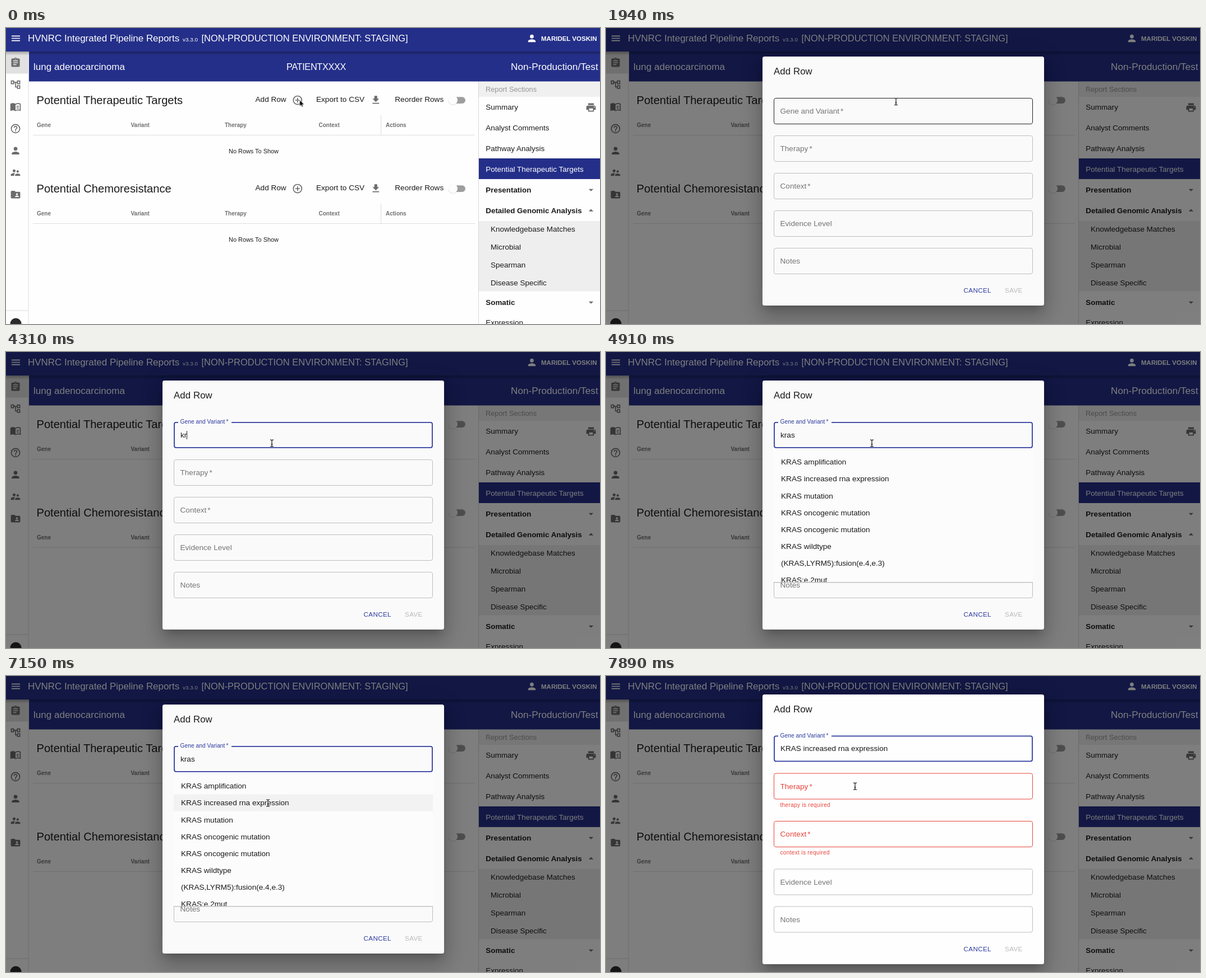
An HTML page that plays this animation: 1059x529 px, repeating every 8 s.

```html
<!DOCTYPE html>
<html lang="en">
<head>
<meta charset="utf-8">
<title>Add Row</title>
<style>
html, body { margin: 0; width: 100%; height: 100%; overflow: hidden; background: #fff; }
svg, .shade { position: absolute; left: 0; top: 0; width: 1059px; height: 529px; overflow: hidden; }
text { font-family: "Liberation Sans", Arial, Helvetica, sans-serif; white-space: pre; }
.b { font-weight: bold; }
.shade { background: rgba(0,0,0,.5); }
.box {
  position: absolute; left: 279px; width: 502px; border-radius: 3.5px;
  box-shadow: 0 9px 13px -6px rgba(0,0,0,.2), 0 20px 32px 2px rgba(0,0,0,.14), 0 7px 38px 7px rgba(0,0,0,.12);
}
.focus { fill: none; stroke: #2f3c9f; stroke-width: 1.8; }

/* every change is a hard step on one 8 s clock */
.shade, .box, .short, .tall, .hover, .active, .label, .typed, .caret, .caret2, .list, .row,
.ripple, .cursor, .arrow, .hand, .beam { animation: 8s step-end infinite; }
.shade { animation-name: shade; }
.box { animation-name: box; }
.short { animation-name: short; }
.tall { animation-name: tall; }
.hover { animation-name: hover; }
.active { animation-name: active; }
.label { animation-name: label; }
.typed { animation-name: typed; }
.caret { animation-name: caret; }
.caret2 { animation-name: caret2; }
.list { animation-name: list; }
.row { animation-name: row; }
.ripple { animation-name: ripple; }
.cursor { animation-name: cursor; }
.arrow { animation-name: arrow; }
.hand { animation-name: hand; }
.beam { animation-name: beam; }

@keyframes ripple { 0%, 24.25%, 100% { visibility: hidden } 22.375% { visibility: visible } }
@keyframes shade { 0% { visibility: hidden } 24.25%, 100% { visibility: visible } }
@keyframes box {
  0% { top: 51px; height: 445px; background: #fafafa }
  91.25%, 100% { top: 33px; height: 482px; background: #fefefe }
}
@keyframes short { 0%, 91.25%, 100% { visibility: hidden } 24.25% { visibility: visible } }
@keyframes tall { 0% { visibility: hidden } 91.25%, 100% { visibility: visible } }
@keyframes hover { 0%, 40.875%, 100% { visibility: hidden } 24.25% { visibility: visible } }
@keyframes active { 0%, 91.25%, 100% { visibility: hidden } 40.875% { visibility: visible } }
@keyframes label {
  0% { font-size: 11px; transform: translateY(5.5px) }
  42.625%, 100% { font-size: 10.3px; transform: none }
}
@keyframes typed {
  0%, 91.25%, 100% { visibility: hidden; clip-path: inset(-2px 100% -2px 0) }
  52% { visibility: visible; clip-path: inset(-2px 73% -2px 0) }
  53.875% { visibility: visible; clip-path: inset(-2px 56% -2px 0) }
  55.75% { visibility: visible; clip-path: inset(-2px 26% -2px 0) }
  57.625% { visibility: visible; clip-path: inset(-2px -2px -2px 0) }
}
@keyframes caret {
  0% { visibility: hidden; transform: none }
  40.875% { visibility: visible }
  46.375% { visibility: hidden }
  52% { visibility: visible; transform: translateX(7px) }
  53.875% { transform: translateX(11px); visibility: visible }
  55.75% { transform: translateX(19px); visibility: visible }
  57.625% { transform: translateX(25px); visibility: visible }
  61.375% { visibility: hidden }
  67% { visibility: visible }
  74.5% { visibility: hidden }
  80% { visibility: visible }
  85.625%, 100% { visibility: hidden; transform: translateX(25px) }
}
@keyframes caret2 { 0%, 96.75%, 100% { visibility: hidden } 91.25% { visibility: visible } }
@keyframes list { 0%, 91.25%, 100% { visibility: hidden } 59.5% { visibility: visible } }
@keyframes row { 0%, 91.25%, 100% { visibility: hidden } 89.375% { visibility: visible } }
@keyframes cursor {
  0% { transform: translate(523.5px, 128.5px) }
  11.25% { transform: translate(517.5px, 131px) }
  22.375% { transform: translate(517px, 131.5px) }
  31.5% { transform: translate(503px, 142px) }
  33.375% { transform: translate(474px, 163px) }
  76.375% { transform: translate(473px, 172px) }
  78.25% { transform: translate(471px, 190px) }
  80% { transform: translate(468px, 212px) }
  81.875% { transform: translate(467px, 227px) }
  96.75% { transform: translate(453px, 208px) }
  98.625%, 100% { transform: translate(444px, 197px) }
}
@keyframes arrow {
  0%, 78.25%, 91.25% { visibility: visible }
  11.25%, 89.375%, 96.75%, 100% { visibility: hidden }
}
@keyframes hand { 0%, 22.375%, 100% { visibility: hidden } 11.25% { visibility: visible } }
@keyframes beam {
  0%, 78.25%, 91.25% { visibility: hidden }
  22.375%, 89.375%, 96.75%, 100% { visibility: visible }
}
</style>
</head>
<body>
<svg id="page" viewBox="0 0 1059 529"></svg>
<div class="shade"><div class="box"></div></div>
<svg id="dialog" viewBox="0 0 1059 529"></svg>
<svg viewBox="0 0 1059 529">
  <g class="cursor">
    <path class="arrow" d="M0 0V11.4L2.6 9 4.3 12.8 6.2 12 4.6 8.3H8.1Z" stroke="#fff" stroke-width=".8"/>
    <path class="hand" transform="translate(-5.5 -3)" fill="#fff" stroke="#000" d="M4.2 10.5V2.2a1.5 1.5 0 0 1 3 0V7.5a1.4 1.4 0 0 1 2.6.4 1.4 1.4 0 0 1 2.5.7 1.3 1.3 0 0 1 2.2 1V13c0 2-1.5 3-1.5 5H5.5C5 15 2 13 .8 10.8c-.6-1.3 1-2.2 2-1.2z"/>
    <g class="beam" fill="none">
      <path stroke="#fff" stroke-opacity=".8" stroke-width="2.4" d="M-3-6.2Q-.3-6.2 0-4.8 .3-6.2 3-6.2M0-4.8V4.8M-3 6.2Q-.3 6.2 0 4.8 .3 6.2 3 6.2M-1.7 2H1.7"/>
      <path stroke="#111" stroke-width="1.2" d="M-3-6.2Q-.3-6.2 0-4.8 .3-6.2 3-6.2M0-4.8V4.8M-3 6.2Q-.3 6.2 0 4.8 .3 6.2 3 6.2M-1.7 2H1.7"/>
    </g>
  </g>
</svg>
<script>
const NAVY = '#242f89', INK = '#1b1b1b', GREY = '#6c6c6c', RED = '#e8453a', BLUE = '#2f3c9f';

const text = (x, y, s, size = 13.6, fill = INK, more = '') =>
  `<text x="${x}" y="${y}" font-size="${size}" fill="${fill}" ${more}>${s}</text>`;
const rect = (x, y, w, h, fill, more = '') =>
  `<rect x="${x}" y="${y}" width="${w}" height="${h}" fill="${fill}" ${more}/>`;
// 24-unit icon centred on a point
const icon = (x, y, d, fill = GREY) =>
  `<path transform="translate(${x - 10.05} ${y - 10.05}) scale(.8375)" fill="${fill}" d="${d}"/>`;
const bold = 'class="b"';

const icons = {
  menu: 'M3 18h18v-2H3zm0-5h18v-2H3zm0-7v2h18V6z',
  person: 'M12 12a4 4 0 1 0 0-8 4 4 0 0 0 0 8zm0 2c-2.67 0-8 1.34-8 4v2h16v-2c0-2.66-5.33-4-8-4z',
  clip: 'M19 3h-4.18a3 3 0 0 0-5.64 0H5a2 2 0 0 0-2 2v14a2 2 0 0 0 2 2h14a2 2 0 0 0 2-2V5a2 2 0 0 0-2-2zm-7 0a1 1 0 1 1 0 2 1 1 0 0 1 0-2zm2 14H7v-2h7zm3-4H7v-2h10zm0-4H7V7h10z',
  tree: 'M22 11V3h-7v3H9V3H2v8h7V8h2v10h4v3h7v-8h-7v3h-2V8h2v3zM7 9H4V5h3zm10 6h3v4h-3zm0-10h3v4h-3z',
  book: 'M12 6C9 4 4 4 1 6v15c3-1.4 8-1.4 11 .5 3-1.9 8-1.9 11-.5V6c-3-2-8-2-11 0zm9 12.5c-3-.9-6.5-.4-9 1V8c2.5-1.5 6-1.9 9-1zM14 10.2h5v1.3h-5zM14 12.7h5v1.3h-5zM14 15.2h5v1.3h-5z',
  help: 'M11 18h2v-2h-2zm1-16a10 10 0 1 0 0 20 10 10 0 0 0 0-20zm0 18a8 8 0 1 1 0-16 8 8 0 0 1 0 16zm0-14a4 4 0 0 0-4 4h2a2 2 0 1 1 4 0c0 2-3 1.75-3 5h2c0-2.25 3-2.5 3-5a4 4 0 0 0-4-4z',
  people: 'M16.5 12a2.5 2.5 0 1 0 0-5 2.5 2.5 0 0 0 0 5zM9 11a3 3 0 1 0 0-6 3 3 0 0 0 0 6zm7.5 3c-1.83 0-5.5.92-5.5 2.75V19h11v-2.25c0-1.83-3.67-2.75-5.5-2.75zM9 13c-2.33 0-7 1.17-7 3.5V19h7v-2.25c0-.85.33-2.34 2.37-3.47C10.5 13.1 9.66 13 9 13z',
  folder: 'M20 6h-8l-2-2H4a2 2 0 0 0-2 2v12a2 2 0 0 0 2 2h16a2 2 0 0 0 2-2V8a2 2 0 0 0-2-2zm-5 3a2 2 0 1 1 0 4 2 2 0 0 1 0-4zm4 8h-8v-1c0-1.33 2.67-2 4-2s4 .67 4 2z',
  add: 'M13 7h-2v4H7v2h4v4h2v-4h4v-2h-4zm-1-5a10 10 0 1 0 0 20 10 10 0 0 0 0-20zm0 18a8 8 0 1 1 0-16 8 8 0 0 1 0 16z',
  load: 'M19 9h-4V3H9v6H5l7 7zM5 18v2h14v-2z',
  print: 'M19 8H5a3 3 0 0 0-3 3v6h4v4h12v-4h4v-6a3 3 0 0 0-3-3zm-3 11H8v-5h8zm3-7a1 1 0 1 1 0-2 1 1 0 0 1 0 2zm-1-9H6v4h12z',
  down: 'M7 10l5 5 5-5z',
  up: 'M7 14l5-5 5 5z'
};

function table(title, y) {
  const heads = [['Gene', 55], ['Variant', 222.5], ['Therapy', 390], ['Context', 557.5], ['Actions', 677]];
  return text(54.5, y + 136, title, 20.1) +
    text(444.5, y + 132.4, 'Add Row') + icon(519.8, y + 129, icons.add) +
    text(553, y + 132.4, 'Export to CSV') + icon(659.3, y + 128.8, icons.load) +
    text(693.3, y + 132.4, 'Reorder Rows') +
    rect(790.5, y + 123.2, 28.5, 11.7, '#9e9e9e', 'rx="5.85"') +
    `<circle cx="797" cy="${y + 129.6}" r="8.5" fill="#000" opacity=".16"/>` +
    `<circle cx="797" cy="${y + 129}" r="8.2" fill="#fdfdfd"/>` +
    heads.map(([s, x]) => text(x, y + 177, s, 10, '#707070', bold)).join('') +
    rect(668, y + 156, 1, 35, '#dcdcdc') + rect(48, y + 191, 788, 1, '#dfdfdf') +
    text(441.5, y + 223.5, 'No Rows To Show', 10.9, INK, 'text-anchor="middle"');
}

function leftBar() {
  const names = ['clip', 'tree', 'book', 'help', 'person', 'people', 'folder'];
  return rect(0, 42, 39.5, 39.5, '#e1e1e1') + rect(39.5, 42, 1, 487, '#dcdcdc') +
    names.map((n, i) => icon(17, 62 + i * 39.3, icons[n])).join('') +
    rect(0, 504.5, 40, 1, '#dcdcdc') + '<circle cx="17.5" cy="528.5" r="10" fill="#2b2b2b"/>';
}

function rightBar() {
  const main = [['Summary', 146], ['Analyst Comments', 183], ['Pathway Analysis', 219.7], ['Expression', 531]];
  const groups = [['Presentation', 294, 'down'], ['Detailed Genomic Analysis', 330.8, 'up'], ['Somatic', 495, 'down']];
  const subs = ['Knowledgebase Matches', 'Microbial', 'Spearman', 'Disease Specific'];
  return rect(842, 95, 1, 434, '#d8d8d8') + rect(843, 96, 216, 27, '#f0f0f0') +
    text(855, 114, 'Report Sections', 12.8, '#969696') +
    icon(1043, 142, icons.print) +
    rect(843, 233, 216, 37, NAVY) + text(855.3, 256.5, 'Potential Therapeutic Targets', 13.45, '#fff') +
    rect(843, 345, 216, 125.5, '#eee') +
    main.map(([s, y]) => text(855.3, y, s, 13.5)).join('') +
    groups.map(([s, y, a]) => text(855.3, y, s, 13.4, INK, bold) + icon(1043, y - 4.7, icons[a])).join('') +
    subs.map((s, i) => text(864, 364.4 + i * 31.8, s, 13.5)).join('');
}

function topBars() {
  return rect(41, 42, 1018, 53.5, NAVY) +
    text(49, 74.5, 'lung adenocarcinoma', 17.05, '#fff') +
    text(500, 74.5, 'PATIENTXXXX', 16.3, '#fff', 'letter-spacing="-.35"') +
    text(900, 74.5, 'Non-Production/Test', 17.2, '#fff') +
    '<linearGradient id="fall" x2="0" y2="1"><stop stop-opacity=".28"/><stop offset="1" stop-opacity="0"/></linearGradient>' +
    rect(0, 42, 1059, 7, 'url(#fall)') + rect(0, 0, 1059, 42, NAVY) +
    icon(17.5, 18.5, icons.menu, '#fff') +
    text(39, 24.2, 'HVNRC Integrated Pipeline Reports', 16.95, '#fff') +
    text(315, 24.2, 'v3.3.0', 9.9, '#fff') +
    text(348.5, 24.2, '[NON-PRODUCTION ENVIRONMENT: STAGING]', 16.47, '#fff') +
    icon(937.5, 18.5, icons.person, '#fff') +
    text(954, 22.5, 'MARIDEL VOSKIN', 11.5, '#fff', bold);
}

document.getElementById('page').innerHTML =
  rect(0, 0, 1059, 529, '#fefefe') + table('Potential Therapeutic Targets', 0) +
  table('Potential Chemoresistance', 158) +
  '<g class="ripple"><circle cx="520" cy="129" r="20" opacity=".05"/><circle cx="520" cy="129" r="9.5" opacity=".14"/></g>' +
  leftBar() + rightBar() + topBars();

const star = '<tspan dx="2">*</tspan>';
const field = (y, label, line = '#bdbdbd', ink = '#757575') =>
  rect(299.5, y + .5, 461, 46, 'none', `rx="3.4" stroke="${line}"`) + text(310.5, y + 28, label, 13.6, ink);
const focus = y =>
  `<path class="focus" d="M402 ${y + .8}H757q3 0 3 3v39q0 3-3 3H303q-3 0-3-3v-39q0-3 3-3H307"/>`;
const frame = (top, bottom) =>
  text(299, top + 32, 'Add Row', 16.75, INK, 'letter-spacing=".12"') +
  text(637.5, bottom - 23.5, 'CANCEL', 11.7, BLUE, 'letter-spacing=".33"') +
  text(711, bottom - 23.5, 'SAVE', 11.7, '#b9b9b9', 'letter-spacing=".33"');
const hint = (y, s) => text(310.5, y, s, 10.05, RED, 'letter-spacing=".33"');

const options = ['KRAS amplification', 'KRAS increased rna expression', 'KRAS mutation',
  'KRAS oncogenic mutation', 'KRAS oncogenic mutation', 'KRAS wildtype',
  '(KRAS,LYRM5):fusion(e.4,e.3)', 'KRAS:e.2mut'];

const short = frame(51, 496) +
  `<g class="hover">${field(125, 'Gene and Variant' + star, '#222')}</g>` +
  field(192, 'Therapy' + star) + field(259, 'Context' + star) +
  field(326, 'Evidence Level') + field(393, 'Notes') +
  `<g class="active">${focus(125)}<text class="label" x="310.5" y="128" fill="${BLUE}">Gene and Variant${star}</text></g>` +
  text(311, 153, 'kras', 13.6, INK, 'class="typed"') +
  rect(311, 141, 1, 15, '#222', 'class="caret"') +
  '<clipPath id="cut"><rect x="299" y="172" width="462" height="239"/></clipPath>' +
  `<g class="list">${rect(299, 174, 462, 238.5, '#000', 'opacity=".22" rx="3"')}${rect(299, 172, 462, 239, '#fcfcfc')}` +
  rect(299, 211.5, 462, 30, '#f2f2f2', 'class="row"') +
  `<g clip-path="url(#cut)">${options.map((s, i) => text(312, 201.3 + i * 30.15, s)).join('')}</g></g>`;

const tall = frame(33, 515) + focus(106.5) +
  text(310.5, 109.8, 'Gene and Variant' + star, 10.3, BLUE) +
  text(311, 134.2, 'KRAS increased rna expression', 13.5) +
  rect(501, 122, 1, 15, '#222', 'class="caret2"') +
  field(173.5, 'Therapy' + star, RED, RED) + hint(234, 'therapy is required') +
  field(259, 'Context' + star, RED, RED) + hint(319.3, 'context is required') +
  field(344.5, 'Evidence Level') + field(411.5, 'Notes');

document.getElementById('dialog').innerHTML = `<g class="short">${short}</g><g class="tall">${tall}</g>`;
</script>
</body>
</html>
```
